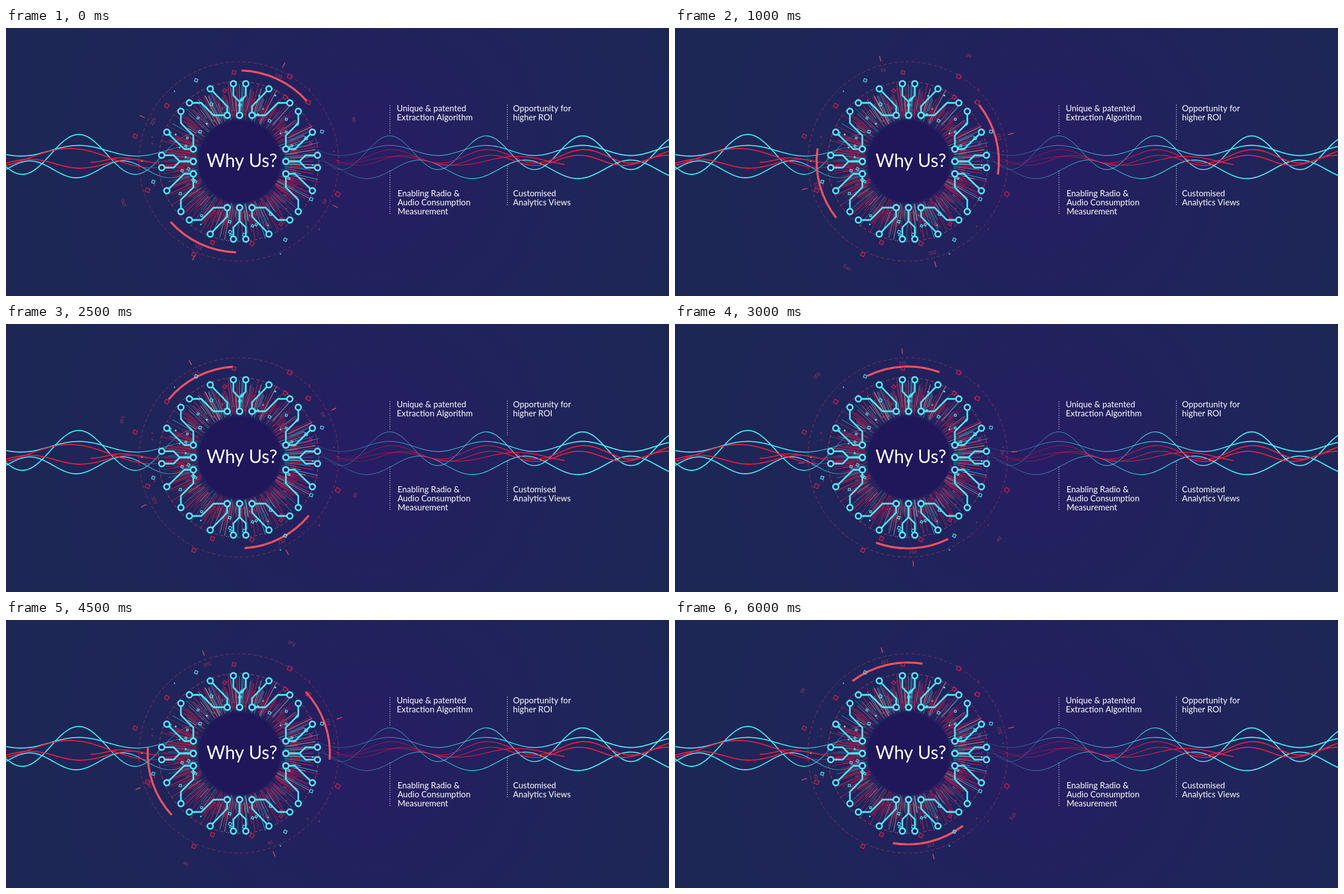
Write an HTML page with a canvas that moves like this. It is 1175x476 px and loops after 6500 ms.

```html
<!DOCTYPE html>
<html lang="en">
<head>
<meta charset="utf-8">
<title>Why Us?</title>
<style>
html, body { margin: 0; width: 100%; height: 100%; overflow: hidden; background: #1e2757; }
canvas { display: block; }
</style>
</head>
<body>
<canvas id="stage" width="1175" height="476"></canvas>
<script>
const ctx = document.getElementById('stage').getContext('2d');
const W = 1175, H = 476, TAU = Math.PI * 2, RAD = Math.PI / 180;
const CYAN = '#46f3fb', RED = '#f01e46', CORAL = '#ff5161', PALE = '#f3c9b8';
const HUB = [414, 237], DIAL = [412.5, 237];
const FONT = 'Lato, "Open Sans", sans-serif';

// The dial moves once per half second. It shows its back for the first
// two steps, then its front; keys are [step, heading in degrees].
const STEP = 500, STEPS = 13, BACK_STEPS = 2;
const BACK_KEYS = [[0, -20], [1, 10]];
const FRONT_KEYS = [[2, -60], [3, -30], [8, 90], [11, 167], [12, 211]];

const LEFT_WAVES = [
  { color: CYAN, crest: 129, period: 200, mid: 224.5, amp: 35.5 },
  { color: CYAN, crest: 129, period: 205, mid: 218, amp: 9.5 },
  { color: CYAN, crest: 207, period: 165, mid: 251, amp: 15 },
  { color: RED, crest: 113, period: 290, mid: 231, amp: 17 },
  { color: RED, crest: 222, period: 180, mid: 241, amp: 8 },
  { color: RED, crest: 205, period: 110, mid: 234.5, amp: 4, from: 150 }
];
const RIGHT_WAVES = [
  { color: CYAN, crest: 680, period: 171, mid: 221.5, amp: 30 },
  { color: CYAN, crest: 680, period: 171, mid: 217.5, amp: 9 },
  { color: CYAN, crest: 733, period: 187, mid: 251, amp: 16.5 },
  { color: RED, crest: 684, period: 170, mid: 228, amp: 12 },
  { color: RED, crest: 704, period: 156, mid: 235, amp: 9 },
  { color: RED, crest: 690, period: 215, mid: 236, amp: 8, to: 990 }
];

const RED_SQUARES = [[404, 79], [503, 86], [285, 138], [536, 132], [229, 192],
  [251, 288], [333, 402], [366, 381], [436, 383], [588, 295], [495, 123]];
const CYAN_SQUARES = [[337, 93], [560, 184], [495, 376], [261, 273], [541, 304]];

const BLURBS = [
  [692.5, 148, 'Unique & patented', 'Extraction Algorithm'],
  [898.5, 148, 'Opportunity for', 'higher ROI'],
  [694, 299, 'Enabling Radio &', 'Audio Consumption', 'Measurement'],
  [898.5, 299, 'Customised', 'Analytics Views']
];

const clamp = v => Math.max(0, Math.min(1, v));
const polar = ([x, y], r, a) => [x + r * Math.cos(a), y + r * Math.sin(a)];

function seeded(seed) {
  return () => (seed = (seed * 16807) % 2147483647) / 2147483647;
}

function between(keys, t) {
  const k = Math.max(1, keys.findIndex(([at]) => at >= t));
  const [t0, v0] = keys[k - 1], [t1, v1] = keys[k];
  return v0 + (v1 - v0) * (t - t0) / (t1 - t0);
}

function line(points, color, width) {
  ctx.strokeStyle = color;
  ctx.lineWidth = width;
  ctx.beginPath();
  points.forEach(([x, y]) => ctx.lineTo(x, y));
  ctx.stroke();
}

function arc([x, y], r, from, to, color, width, dash = []) {
  ctx.strokeStyle = color;
  ctx.lineWidth = width;
  ctx.setLineDash(dash);
  ctx.beginPath();
  ctx.arc(x, y, r, from, to);
  ctx.stroke();
  ctx.setLineDash([]);
}

function disc([x, y], r, color) {
  ctx.fillStyle = color;
  ctx.beginPath();
  ctx.arc(x, y, r, 0, TAU);
  ctx.fill();
}

function background() {
  const g = ctx.createRadialGradient(640, 238, 0, 640, 238, 560);
  g.addColorStop(0, '#271d64');
  g.addColorStop(0.4, '#21225d');
  g.addColorStop(1, '#1d2756');
  ctx.fillStyle = g;
  ctx.fillRect(0, 0, W, H);
}

function wave({ color, crest, period, mid, amp, from, to }, fade, weight) {
  const y = x => mid - amp * Math.cos(TAU * (x - crest) / period), step = 5;
  for (let x = from; x < to; x += step) {
    ctx.globalAlpha = fade(x);
    line([[x, y(x)], [x + step, y(x + step)]], color, weight(x));
  }
  ctx.globalAlpha = 1;
}

function waves() {
  for (const w of LEFT_WAVES)
    wave({ from: 0, to: 345, ...w }, x => clamp((375 - x) / 160), x => 1.8 - 0.8 * clamp((x - 170) / 120));
  for (const w of RIGHT_WAVES)
    wave({ from: 500, to: W, ...w }, x => clamp((x - 500) / 270), x => 0.9 + clamp((x - 800) / 220));
}

function rays() {
  const rnd = seeded(4711), count = 360;
  for (let i = 0; i < count; i++) {
    const a = (i + rnd()) / count * TAU, kind = rnd();
    const from = 75 + 26 * rnd() ** 2, to = 98 + 47 * rnd();
    ctx.globalAlpha = 0.6 + 0.4 * rnd();
    line([polar(HUB, from, a), polar(HUB, to, a)],
      kind < 0.7 ? RED : kind < 0.92 ? '#35b9c8' : PALE, 0.9);
  }
  ctx.globalAlpha = 1;
}

function square([x, y], size, color, turn) {
  ctx.save();
  ctx.translate(x, y);
  ctx.rotate(turn);
  ctx.fillStyle = ctx.strokeStyle = color;
  ctx.lineWidth = 1.2;
  const box = [-size / 2, -size / 2, size, size];
  size < 3 ? ctx.fillRect(...box) : ctx.strokeRect(...box);
  ctx.restore();
}

function squares() {
  const rnd = seeded(99);
  RED_SQUARES.forEach(p => square(p, 6 + rnd(), RED, 0.2 + 0.5 * rnd()));
  CYAN_SQUARES.forEach(p => square(p, 5, CYAN, 0.2 + 0.4 * rnd()));
  for (let i = 0; i < 12; i++)
    square(polar(HUB, 150 + 40 * rnd(), rnd() * TAU), 2, i % 4 ? RED : CYAN, 0.3);
  for (let i = 0; i < 54; i++)
    square(polar(HUB, 84 + 50 * rnd(), rnd() * TAU), 2 + 3 * rnd(), i % 6 ? CYAN : RED, 0.2 + 0.5 * rnd());
}

function rings() {
  arc(DIAL, 177, 0, TAU, 'rgba(205,62,98,.6)', 1, [6, 4]);
  arc(DIAL, 142, 0, TAU, 'rgba(225,62,92,.85)', 1, [6, 4]);
  arc(HUB, 91, 0, TAU, 'rgba(225,62,92,.55)', 1, [5, 4]);
}

// face is 1 for the front and -1 for the back, which runs the other way round.
function dial(heading, face) {
  for (const half of [0, 180]) {
    const middle = heading + face * 45 + half;
    arc(DIAL, 161.5, (middle - 23.3) * RAD, (middle + 23.3) * RAD, CORAL, 3.6);
  }
  for (let k = 0; k < 4; k++) {
    const a = (heading + 45 + 90 * k) * RAD;
    line([polar(DIAL, 184, a), polar(DIAL, 194, a)], '#ee5360', 1.3);
  }
  ctx.font = '8px ' + FONT;
  ctx.fillStyle = 'rgba(226,66,94,.75)';
  ctx.textAlign = 'center';
  for (const n of [45, 90, 135, 225, 270, 315]) {
    const a = (heading + face * (n - 90)) * RAD;
    ctx.save();
    ctx.translate(...polar(DIAL, n % 90 ? 168 : 217, a));
    ctx.rotate(a + Math.PI / 2);
    ctx.scale(-face, 1);
    ctx.fillText(n, 0, 3);
    ctx.restore();
  }
}

function node(p) {
  disc(p, 5, '#20195a');
  arc(p, 5, 0, TAU, CYAN, 2.8);
}

// One eighth of the circuit, turned and mirrored around the hub.
function circuit() {
  const tracks = [
    [[-11, -138], [-11, -117], [0, -106], [0, -82]],
    [[-52, -129], [-22, -98], [-22, -82]],
    [[-89, -104], [-68, -104], [-46, -82], [-22, -82]]
  ];
  const eachEighth = draw => {
    for (let k = 0; k < 8; k++) {
      ctx.save();
      ctx.translate(...HUB);
      ctx.rotate((k >> 1) * Math.PI / 2);
      ctx.scale(k % 2 ? -1 : 1, 1);
      tracks.forEach(draw);
      ctx.restore();
    }
  };
  eachEighth(t => line(t, CYAN, 2.8));
  eachEighth(t => { node(t[0]); node(t[t.length - 1]); });
}

function texts() {
  ctx.fillStyle = '#fff';
  ctx.textAlign = 'center';
  ctx.font = '32px ' + FONT;
  ctx.fillText('Why Us?', 418, 247);
  ctx.textAlign = 'left';
  ctx.font = '14.8px ' + FONT;
  for (const [x, y, ...rows] of BLURBS)
    rows.forEach((row, i) => ctx.fillText(row, x, y + 16 * i));
  ctx.setLineDash([2, 2]);
  for (const [x, top, end] of [[680.5, 137, 187], [680.5, 253, 332], [888.5, 136, 198], [888.5, 245, 316]])
    line([[x, top], [x, end]], 'rgba(255,255,255,.7)', 1);
  ctx.setLineDash([]);
}

function paint(step) {
  const back = step < BACK_STEPS;
  background();
  waves();
  rays();
  disc(HUB, 73, '#20175a');
  rings();
  dial(between(back ? BACK_KEYS : FRONT_KEYS, step), back ? -1 : 1);
  squares();
  circuit();
  texts();
}

let shown = -1;
function tick() {
  const step = Math.floor(performance.now() / STEP) % STEPS;
  if (step !== shown) paint(shown = step);
  requestAnimationFrame(tick);
}
tick();
</script>
</body>
</html>
```
